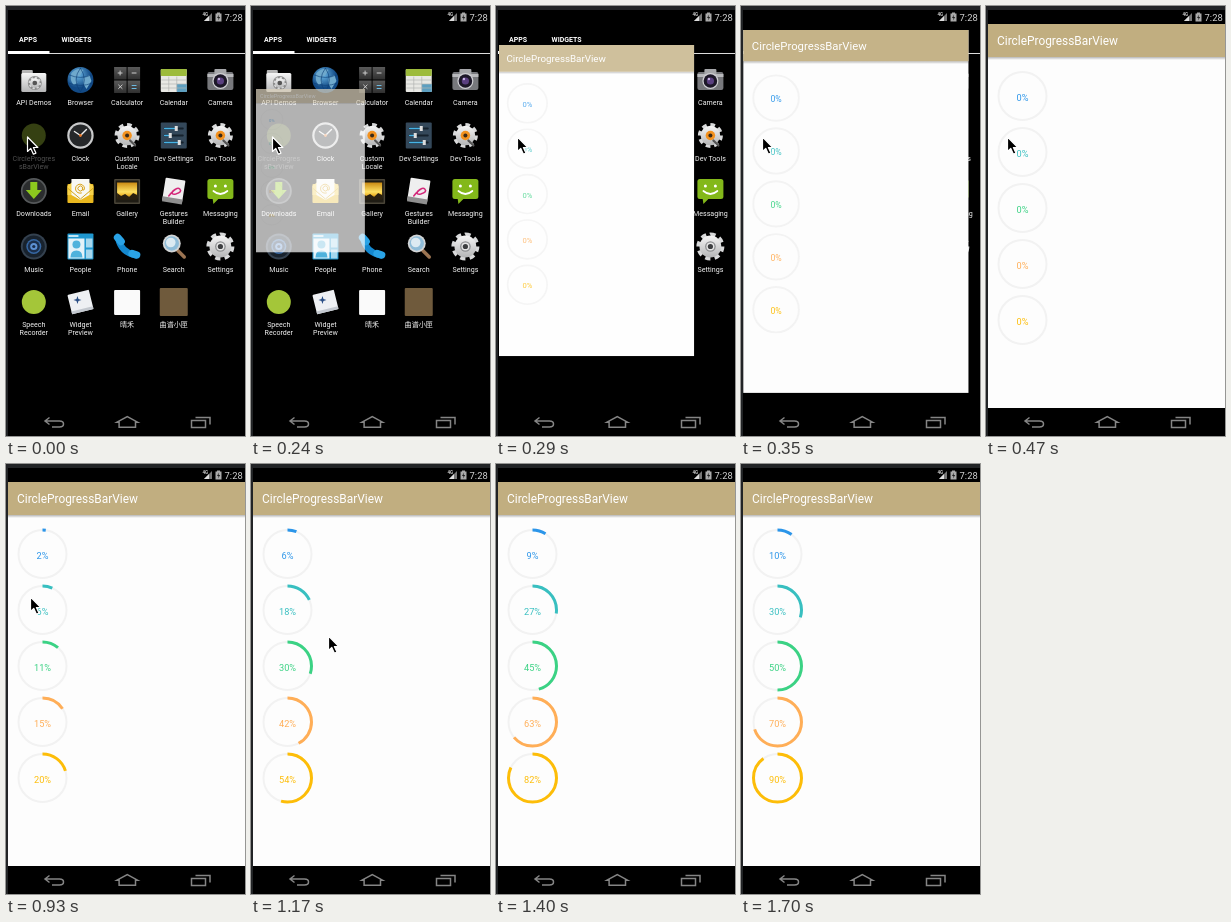
Animation, 239 px wide and 430 px high, one loop 2.67 s. Source, as an HTML page:

```html
<!DOCTYPE html>
<html lang="en">
<head>
<meta charset="utf-8">
<title>Circle progress demo</title>
<style>
  html, body { margin: 0; width: 100%; height: 100%; overflow: hidden; background: #000; }
  svg { display: block; width: 239px; height: 430px; font-family: Roboto, "Noto Sans CJK SC", "Noto Sans CJK", sans-serif; }
  .label { font-size: 7.1px; fill: #f4f4f4; text-anchor: middle; }
  .tab { font-size: 7px; font-weight: 700; fill: #fff; }
  .value { font-size: 9.2px; text-anchor: middle; }
  .pressed { opacity: .32; }
  .line { fill: none; }
</style>
</head>
<body>
<svg viewBox="0 0 239 430">
  <defs>
    <linearGradient id="sunset" x2="0" y2="1">
      <stop offset="0" stop-color="#c98a14"/><stop offset=".55" stop-color="#ffe163"/><stop offset=".75" stop-color="#f0b52a"/><stop offset="1" stop-color="#2b2010"/>
    </linearGradient>
    <linearGradient id="steel" x2="0" y2="1">
      <stop offset="0" stop-color="#f6f6f6"/><stop offset="1" stop-color="#b4b5b6"/>
    </linearGradient>
    <linearGradient id="key" x2="0" y2="1">
      <stop offset="0" stop-color="#5a5a5a"/><stop offset="1" stop-color="#303030"/>
    </linearGradient>
    <radialGradient id="ocean" cx=".4" cy=".3">
      <stop offset="0" stop-color="#6db8e6"/><stop offset="1" stop-color="#124a86"/>
    </radialGradient>
    <linearGradient id="shade" x2="0" y2="1">
      <stop offset="0" stop-color="#000" stop-opacity=".28"/><stop offset="1" stop-color="#000" stop-opacity="0"/>
    </linearGradient>
  </defs>

  <rect width="239" height="430"/>

  <g id="launcher">
    <text class="tab" x="13" y="36">APPS</text>
    <text class="tab" x="55.5" y="36">WIDGETS</text>
    <path d="M2 47.5H239" stroke="#dcdcdc"/>
    <path d="M2 46.500H43.5" stroke="#fff" stroke-width="3"/>
    <g id="apps"></g>
  </g>

  <g id="window">
    <rect x="2" y="18" width="237" height="384" fill="#fdfdfd"/>
    <rect x="2" y="51" width="237" height="3" fill="url(#shade)"/>
    <rect x="2" y="18" width="237" height="33" fill="#c1ae80"/>
    <text x="11" y="39" font-size="11.9" fill="#fff">CircleProgressBarView</text>
    <g id="rings"></g>
    <rect id="fog" x="2" y="18" width="237" height="384" fill="#fff"/>
  </g>

  <g id="status">
    <path d="M198 15L206 7V15Z" fill="#777"/>
    <path d="M198 15L203 10V15Z" fill="#ddd"/>
    <text x="196.5" y="10" font-size="4.5" font-weight="700" fill="#ccc">4G</text>
    <path d="M209.5 7.5H211V6.5H214V7.5H215.5V15.5H209.5Z" fill="#aaa"/>
    <path d="M213 8.5L211 12H212.5L212 14.5L214.2 11H212.6Z" fill="#222"/>
    <text x="218.6" y="14.8" font-size="9.4" fill="#d4d4d4">7:28</text>
  </g>

  <g class="line" stroke="#858585" stroke-width="1.5">
    <path d="M43.500 411.500L39 415L43.500 418.500M39.500 415H53.500Q57.500 415 57.500 418T53.500 421H46"/>
    <path d="M111 416.200L121.300 410.500L131.600 416.200H129.500V421.300H113.100V416.200Z"/>
    <path d="M185.500 414.500H199.500V421.500H185.500ZM189.500 411.500H204V418.500"/>
  </g>

  <rect width="239" height="4" fill="#222426"/>
  <rect width="2" height="430" fill="#222426"/>

  <path id="cursor" d="M0 0V14.500L3.300 11.400L5.900 17.200L8.400 16.100L5.900 10.500H10.300Z"
        fill="#000" stroke="#fff" stroke-width="1.200" stroke-linejoin="round"/>
</svg>

<script>
const $ = id => document.getElementById(id);
const LOOP = 2670;

// Icon helpers, all centred on 0,0
const rect = (x, y, w, h, fill, r = 0) =>
  `<rect x="${x}" y="${y}" width="${w}" height="${h}" rx="${r}" fill="${fill}"/>`;
const disc = (r, fill, x = 0, y = 0) => `<circle cx="${x}" cy="${y}" r="${r}" fill="${fill}"/>`;
const shape = (d, fill) => `<path d="${d}" fill="${fill}"/>`;
const line = (d, color, w = 1.5) =>
  `<path class="line" d="${d}" stroke="${color}" stroke-width="${w}" stroke-linecap="round" stroke-linejoin="round"/>`;
const tilt = (angle, content) => `<g transform="rotate(${angle})">${content}</g>`;
const gear = (r, hub) =>
  `<circle class="line" r="${r * .82}" stroke="#d8d9da" stroke-width="${r * .36}" pathLength="16" stroke-dasharray="1.1 .9"/>` +
  disc(r * .78, 'url(#steel)') + disc(r * .38, hub);
const tool = gear(12.5, '#f3921f') + disc(2, '#3a2a18') + line('M3 5L8 10', '#555', 2.2);

const icons = {
  folder: rect(-12, -10, 11, 8, '#b5b5b5', 1) + rect(-12.5, -7, 25, 19, 'url(#steel)', 1.5) +
    `<g transform="translate(1 3)">${disc(7, '#8c8c8c')}${gear(6.2, '#555')}</g>`,
  globe: disc(13, 'url(#ocean)') + shape('M-9-7Q-3-13 3-10L0-5L-5-2L-3 3L-7 5Q-11 0-9-7ZM3-2L9-5L11 1L6 9L3 4Z', '#6fa9cc') +
    line('M-12 3Q0 8 12 3M-11-5Q0 0 11-5M0-12Q8 0 0 12M0-12Q-9 0 0 12', '#0d3d75', .6),
  calc: [[-13, -13], [.5, -13], [-13, .5], [.5, .5]].map(([x, y]) => rect(x, y, 12.5, 12.5, 'url(#key)')).join('') +
    line('M-9-7H-5M-7-9V-5M5-7H9M-8.500 5L-5 8.500M-5 5L-8.500 8.500', '#ccc', 1) + line('M5 5.500H9M5 8.500H9', '#6cb9e0', 1.1),
  calendar: rect(-13, -11, 26, 23, '#e8e8e4', 1) + rect(-13, -11, 26, 7, '#9dbb3c', 1) + rect(3, 4, 10, 8, '#5d9fc0') +
    line('M-12 0H12M-12 4H12M-12 8H12M-5-3V11M3-3V11', '#b4b5b2', .7),
  camera: rect(-13, -8, 26, 18, '#77787c', 2) + rect(-6, -11, 12, 6, '#a6a7aa', 1) + rect(-13, -6, 26, 3, '#b8b9bc') +
    disc(8, '#d0d0d4', 0, 1) + disc(6.8, '#1c1728', 0, 1) + disc(3.6, '#5a3f80', 0, 1) + disc(1.2, '#c9b4e6', -1.5, -1),
  clock: disc(13.2, '#c9cacb') + disc(11, '#26282a') + line('M0 0L6-6M0 0L-6-4', '#eee', 1.4) + disc(1.4, '#e8792a'),
  sliders: rect(-13, -13, 26, 26, '#34485a', 1) + line('M-9-7H9M-9 0H9M-9 7H9', '#16222d', 2) +
    line('M-9-7H2M-9 0H-4M-9 7H4', '#46b3e6', 1.6) + rect(1, -9.5, 3, 5, '#ddd') + rect(-5, -2.5, 3, 5, '#ddd') + rect(4, 4.5, 3, 5, '#ddd'),
  download: disc(13, '#55585a') + disc(11.2, '#2b2d2e') + shape('M-3.500-9H3.500V-1H8L0 8L-8-1H-3.500Z', '#8cc81e'),
  mail: rect(-13, -7, 26, 19, '#e9b81f', 1) + shape('M-13-5L-8-9H8L13-5V4H-13Z', '#f7d24a') +
    shape('M-9-12H9V4L0 9L-9 4Z', '#f8f8f4') + line('M2-1A2.500 2.500 0 1 1 2-4V-1Q4 0 4-3A4.500 4.500 0 1 0 1 2', '#d9a31a', 1) +
    line('M-13-3L0 8L13-3', '#d3a51c', 1),
  gallery: rect(-13, -12, 26, 25, '#4a4538', 1) + rect(-11.5, -10.5, 23, 22, '#1f1c14') + rect(-10, -8.5, 20, 17, 'url(#sunset)') +
    shape('M-10 8.500V2L-6 5L-2 3L2 6L6 2L10 4V8.500Z', '#2b2010'),
  gesture: tilt(9, rect(-10, -12, 20, 23, '#efefef', 1) + rect(-10, 7, 20, 5, '#8f8f8f')) +
    line('M-5 5Q3-5 6-2T2 3Q-3 4-1 0', '#d42a7b', 1.6),
  chat: rect(-13, -12, 26, 20, '#83b81a', 2.5) + shape('M-8 6H0L-7 13Z', '#83b81a') +
    disc(1.5, '#fff', -5, -5) + disc(1.5, '#fff', 5, -5) + line('M-7 0Q0 6 7 0', '#fff', 1.7),
  music: disc(13, '#34414f') + disc(11, '#18222d') + disc(7.5, '#3667a3') + disc(6, '#1b2f4c') + disc(3.6, '#5d91d4') + disc(1.6, '#1a2c49'),
  people: rect(-13, -13, 26, 26, '#1f97cf', 1) + rect(-12, -8, 16, 20, '#e4f2f8') + disc(4, '#4fb2dc', -4, -2) +
    shape('M-10 11Q-10 4-4 4T2 11Z', '#4fb2dc') + rect(5.5, -8, 6.5, 9, '#a6d8ee') + rect(5.5, 3, 6.5, 9, '#a6d8ee') + rect(-12, -11.5, 10, 2, '#bfe4f4'),
  phone: line('M-9-8Q-6 6 9 9', '#1488cf', 6) + line('M-9.500-9L-6-5M5 7L9.500 8.500', '#2aa3e6', 7.500),
  search: line('M4 4L10.500 10.500', '#9b7452', 3.5) + disc(9, '#d3d5d6', -2, -3) + disc(7.2, '#8fbcd8', -2, -3) + disc(4.8, '#dceaf2', -3, -4),
  settings: gear(14, '#8d8f91') + disc(4, '#e6e6e6') + disc(2.6, '#3c3e40'),
  tool,
  green: disc(12, '#a4c639'),
  card: tilt(-14, rect(-11, -10, 22, 20, '#eef0f3', 1) + rect(-11, 7, 22, 3, '#c3c8cf')) +
    shape('M-3-6L-2-3L1-2L-2-1L-3 2L-4-1L-7-2L-4-3Z', '#2b4f86'),
  white: rect(-13, -12, 26, 25, '#fafafa', 1),
  brown: rect(-14, -14, 28, 28, '#6f5a3c', 1)
};

const apps = [
  ['folder', 'API Demos'], ['globe', 'Browser'], ['calc', 'Calculator'], ['calendar', 'Calendar'], ['camera', 'Camera'],
  ['green', 'CircleProgres', 'sBarView'], ['clock', 'Clock'], ['tool', 'Custom', 'Locale'], ['sliders', 'Dev Settings'], ['tool', 'Dev Tools'],
  ['download', 'Downloads'], ['mail', 'Email'], ['gallery', 'Gallery'], ['gesture', 'Gestures', 'Builder'], ['chat', 'Messaging'],
  ['music', 'Music'], ['people', 'People'], ['phone', 'Phone'], ['search', 'Search'], ['settings', 'Settings'],
  ['green', 'Speech', 'Recorder'], ['card', 'Widget', 'Preview'], ['white', '晴禾'], ['brown', '曲谱小匣']
];
const PRESSED = 5;

$('apps').innerHTML = apps.map(([icon, ...words], i) => {
  const x = 27.8 + i % 5 * 46.65, y = 74 + Math.floor(i / 5) * 55.5;
  const text = words.map((w, k) => `<text class="label" y="${25 + k * 8.2}">${w}</text>`).join('');
  return `<g transform="translate(${x} ${y})"${i === PRESSED ? ' class="pressed"' : ''}>${icons[icon]}${text}</g>`;
}).join('');

const goals = [[10, '#2b95e9'], [30, '#38bfc0'], [50, '#3bd284'], [70, '#ffae57'], [90, '#fdbd08']];

$('rings').innerHTML = goals.map(([, color], i) => `
  <g transform="translate(36.5 ${90 + i * 56})">
    <circle class="line" r="24" stroke="#f2f2f2" stroke-width="2"/>
    <circle class="line arc" r="24" stroke="${color}" stroke-width="3" pathLength="100" transform="rotate(-90)"/>
    <text class="value" y="4.6" fill="${color}">0%</text>
  </g>`).join('');
const arcs = document.querySelectorAll('.arc');
const values = document.querySelectorAll('.value');

// The screen refreshes only at these moments
const ticks = [0, 240, 290, 350, 410, 470, 700, 760, 820, 880, 930, 990, 1050, 1110,
  1170, 1220, 1280, 1340, 1400, 1460, 1520, 1580, 1640, 1700];

// time, left, top, scale x, scale y, opacity, white veil
const opening = [
  [240, 5, 83, .459, .425, .7, .5],
  [290, 3, 39, .823, .81, 1, .22],
  [350, 2.3, 24, .95, .945, 1, .06],
  [410, 2, 19.2, .99, .988, 1, 0],
  [470, 2, 18, 1, 1, 1, 0]
];

// time, x, y
const route = [
  [0, 21.5, 131], [820, 21.5, 131], [930, 24.5, 133], [1050, 33, 138], [1110, 49, 149],
  [1170, 77.5, 172], [1220, 136, 224], [1280, 190, 305], [1340, 226, 395], [1400, 228, 450]
];

function along(points, t) {
  const i = points.findIndex(p => p[0] > t);
  if (i < 0) return points[points.length - 1].slice(1);
  const a = points[i - 1], b = points[i], k = (t - a[0]) / (b[0] - a[0]);
  return [a[1] + (b[1] - a[1]) * k, a[2] + (b[2] - a[2]) * k];
}

function progress(t) {
  const x = Math.min(1, Math.max(0, (t - 633) / 947));
  return (1 - Math.cos(Math.PI * x)) / 2;
}

function draw(now) {
  const time = now % LOOP;
  const t = ticks.filter(k => k <= time).pop();

  const pose = opening.filter(p => p[0] <= t).pop();
  $('window').style.display = pose ? '' : 'none';
  if (pose) {
    const [, x, y, sx, sy, alpha, veil] = pose;
    $('window').setAttribute('transform', `translate(${x} ${y}) scale(${sx} ${sy}) translate(-2 -18)`);
    $('window').setAttribute('opacity', alpha);
    $('fog').setAttribute('opacity', veil);
  }

  const f = progress(t);
  goals.forEach(([goal], i) => {
    arcs[i].setAttribute('stroke-dasharray', `${goal * f} 200`);
    arcs[i].style.display = f > 0 ? '' : 'none';
    values[i].textContent = Math.floor(goal * f + 1e-6) + '%';
  });

  $('cursor').setAttribute('transform', `translate(${along(route, t).join(' ')})`);
}

function loop() {
  draw(performance.now());
  requestAnimationFrame(loop);
}
loop();
</script>
</body>
</html>
```
